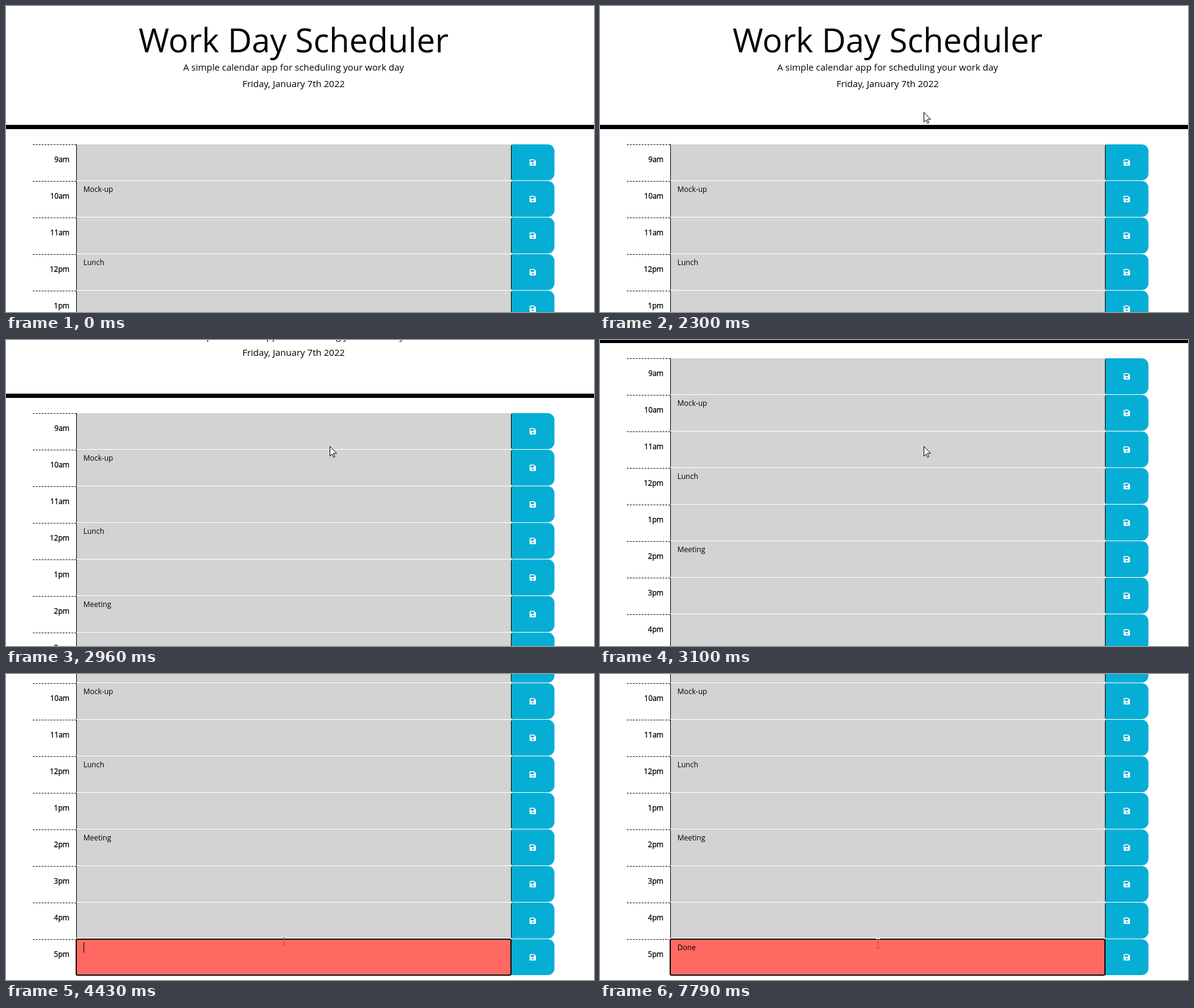
Write an HTML page with a canvas that moves like this. It is 963 by 502 pixels and loops after 7990 ms.

```html
<!DOCTYPE html>
<html lang="en">
<head>
<meta charset="utf-8">
<title>Work Day Scheduler</title>
<style>
  html, body { margin: 0; width: 100%; height: 100%; overflow: hidden; background: #fff; }
  canvas { display: block; width: 963px; height: 502px; }
</style>
</head>
<body>
<canvas id="stage" width="963" height="502"></canvas>
<script>
const ctx = document.getElementById('stage').getContext('2d');
const W = 963, H = 502, LOOP = 7990;
const FIRST_ROW = 227, ROW = 60, CELL = 59;
const AREA_X = 115, AREA_END = 827, TEXT_X = 126.75;
const HOURS = ['9am', '10am', '11am', '12pm', '1pm', '2pm', '3pm', '4pm', '5pm'];
const NOTES = { 1: 'Mock-up', 3: 'Lunch', 5: 'Meeting' };
const NOW = 8;
const FOCUS_AT = 4430;
const KEYS = [[5620, 'D'], [5880, 'o'], [6080, 'n'], [6210, 'e']];
const CARET_ON = [[4430, 4960], [5490, 6740], [7270, 7790]];

// Pointer path: time, x, y
const PATH = [
  [120, 906, 486], [780, 433, 109], [1044, 433, 109], [1240, 429, 125],
  [1580, 515, 192], [1704, 515, 192], [2300, 530, 174], [3564, 530, 174],
  [3700, 522, 182], [4290, 455, 442], [4360, 455, 438], [4690, 455, 442]
];

function snap(t) {
  if (t < 120) return 0;
  const step = Math.floor((t - 110) / 66.33);
  return Math.floor((120 + step * 66.33) / 10) * 10;
}

function scrollAt(t) {
  const u = Math.min(1, Math.max(0, (t - 2700) / 670));
  return t < 2770 ? 0 : Math.round(272 * (1 - Math.pow(1 - u, 1.411)));
}

function pointerAt(t) {
  let i = 0;
  while (i < PATH.length - 1 && PATH[i + 1][0] <= t) i++;
  const a = PATH[i], b = PATH[Math.min(i + 1, PATH.length - 1)];
  const u = b === a ? 0 : (t - a[0]) / (b[0] - a[0]);
  const e = u * u * (3 - 2 * u);
  return [Math.round(a[1] + (b[1] - a[1]) * e), Math.round(a[2] + (b[2] - a[2]) * e)];
}

function rect(color, x, y, w, h) {
  ctx.fillStyle = color;
  ctx.fillRect(x, y, w, h);
}

function rounded(x, y, w, h, radii) {
  ctx.beginPath();
  ctx.roundRect(x, y, w, h, radii);
}

function text(str, x, y, size, align) {
  ctx.font = `400 ${size}px "Open Sans", sans-serif`;
  ctx.textAlign = align;
  ctx.fillStyle = '#000';
  ctx.fillText(str, x, y);
}

function drawHeader() {
  text('Work Day Scheduler', 471, 76, 54, 'center');
  text('A simple calendar app for scheduling your work day', 471, 106, 15, 'center');
  text('Friday, January 7th 2022', 471, 133, 15, 'center');
  rect('#000', 0, 195, W, 7);
}

function drawHour(label, y) {
  ctx.strokeStyle = '#000';
  ctx.lineWidth = 1;
  ctx.setLineDash([3, 1.857]);
  ctx.beginPath();
  ctx.moveTo(44, y + 0.5);
  ctx.lineTo(115, y + 0.5);
  ctx.stroke();
  ctx.setLineDash([]);
  text(label, 104, y + 29, 12, 'right');
  ctx.lineWidth = 0.3;
  ctx.strokeText(label, 104, y + 29);
}

function drawFocus(y) {
  rect('#fff', AREA_X - 2, y - 2, AREA_END - AREA_X + 3, 1);
  rect('#fff', AREA_X - 2, y - 2, 1, CELL + 4);
  ctx.strokeStyle = '#101010';
  ctx.lineWidth = 2;
  rounded(AREA_X, y, AREA_END - AREA_X, CELL, 2);
  ctx.stroke();
}

function drawSaveIcon(x, y) {
  ctx.fillStyle = '#fff';
  ctx.beginPath();
  ctx.moveTo(x + 1.2, y);
  ctx.lineTo(x + 7.6, y);
  ctx.lineTo(x + 10.5, y + 2.9);
  ctx.lineTo(x + 10.5, y + 9.4);
  ctx.arcTo(x + 10.5, y + 10.5, x + 9.4, y + 10.5, 1.1);
  ctx.lineTo(x + 1.1, y + 10.5);
  ctx.arcTo(x, y + 10.5, x, y + 9.4, 1.1);
  ctx.lineTo(x, y + 1.1);
  ctx.arcTo(x, y, x + 1.2, y, 1.1);
  ctx.rect(x + 1.5, y + 1.5, 6, 3);
  ctx.moveTo(x + 6.75, y + 7.5);
  ctx.arc(x + 5.25, y + 7.5, 1.5, 0, Math.PI * 2);
  ctx.fill('evenodd');
}

function drawButton(y) {
  ctx.fillStyle = '#000';
  rounded(AREA_END, y, 40, CELL, 3);
  ctx.fill();
  ctx.fillStyle = '#06aed5';
  rounded(AREA_END + 1, y, 70.25, CELL, [2, 11.25, 11.25, 2]);
  ctx.fill();
  drawSaveIcon(857.5, y + 24.5);
}

function drawRow(i, t) {
  const y = FIRST_ROW + i * ROW;
  drawHour(HOURS[i], y);
  rect(i === NOW ? '#ff6961' : '#d3d3d3', AREA_X, y, AREA_END - AREA_X, CELL);
  rect('#000', AREA_X, y, 1, CELL);
  if (i === NOW && t >= FOCUS_AT) drawFocus(y);
  const note = i === NOW
    ? KEYS.filter(k => t >= k[0]).map(k => k[1]).join('')
    : NOTES[i] || '';
  text(note, TEXT_X, y + 18, 12, 'left');
  if (i === NOW && CARET_ON.some(([from, to]) => t >= from && t < to)) {
    rect('#000', Math.round(TEXT_X + ctx.measureText(note).width), y + 5, 1, 17);
  }
  drawButton(y);
}

function drawArrow(x, y) {
  ctx.save();
  ctx.translate(x, y);
  ctx.beginPath();
  ctx.moveTo(0.5, 0.5);
  [[0.5, 16.5], [4, 13], [6.5, 18.5], [8.7, 17.5], [6.2, 12], [11.5, 12]]
    .forEach(p => ctx.lineTo(p[0], p[1]));
  ctx.closePath();
  ctx.fillStyle = '#fff';
  ctx.fill();
  ctx.strokeStyle = '#000';
  ctx.lineWidth = 1;
  ctx.stroke();
  ctx.restore();
}

function drawBeam(x, y, color, topColor) {
  rect(color, x, y - 7, 1, 14);
  rect(color, x - 3, y + 7, 3, 1);
  rect(color, x + 1, y + 7, 3, 1);
  rect(topColor, x - 3, y - 8, 3, 1);
  rect(topColor, x + 1, y - 8, 3, 1);
}

function overText(x, y) {
  const inArea = y >= FIRST_ROW && x > AREA_X && x < AREA_END;
  const inLead = y >= 90 && y < 111 && x > 291 && x < 651;
  const inDate = y >= 117 && y < 138 && x > 387 && x < 555;
  return inArea || inLead || inDate;
}

function drawPointer(t, scroll) {
  if (t < 120) return;
  const [x, y] = pointerAt(t);
  const resting = t >= 1770 && t < 3630;
  if (resting || !overText(x, y + scroll)) return drawArrow(x, y);
  const onRed = y + scroll >= FIRST_ROW + NOW * ROW;
  drawBeam(x, y, onRed ? '#c9463f' : '#222', t >= FOCUS_AT ? '#fff' : onRed ? '#c9463f' : '#222');
}

function draw(t) {
  const tick = snap(t), scroll = scrollAt(tick);
  rect('#fff', 0, 0, W, H);
  ctx.save();
  ctx.translate(0, -scroll);
  drawHeader();
  HOURS.forEach((_, i) => drawRow(i, t));
  ctx.restore();
  drawPointer(tick, scroll);
}

function loop() {
  draw(performance.now() % LOOP);
  requestAnimationFrame(loop);
}
loop();
</script>
</body>
</html>
```
